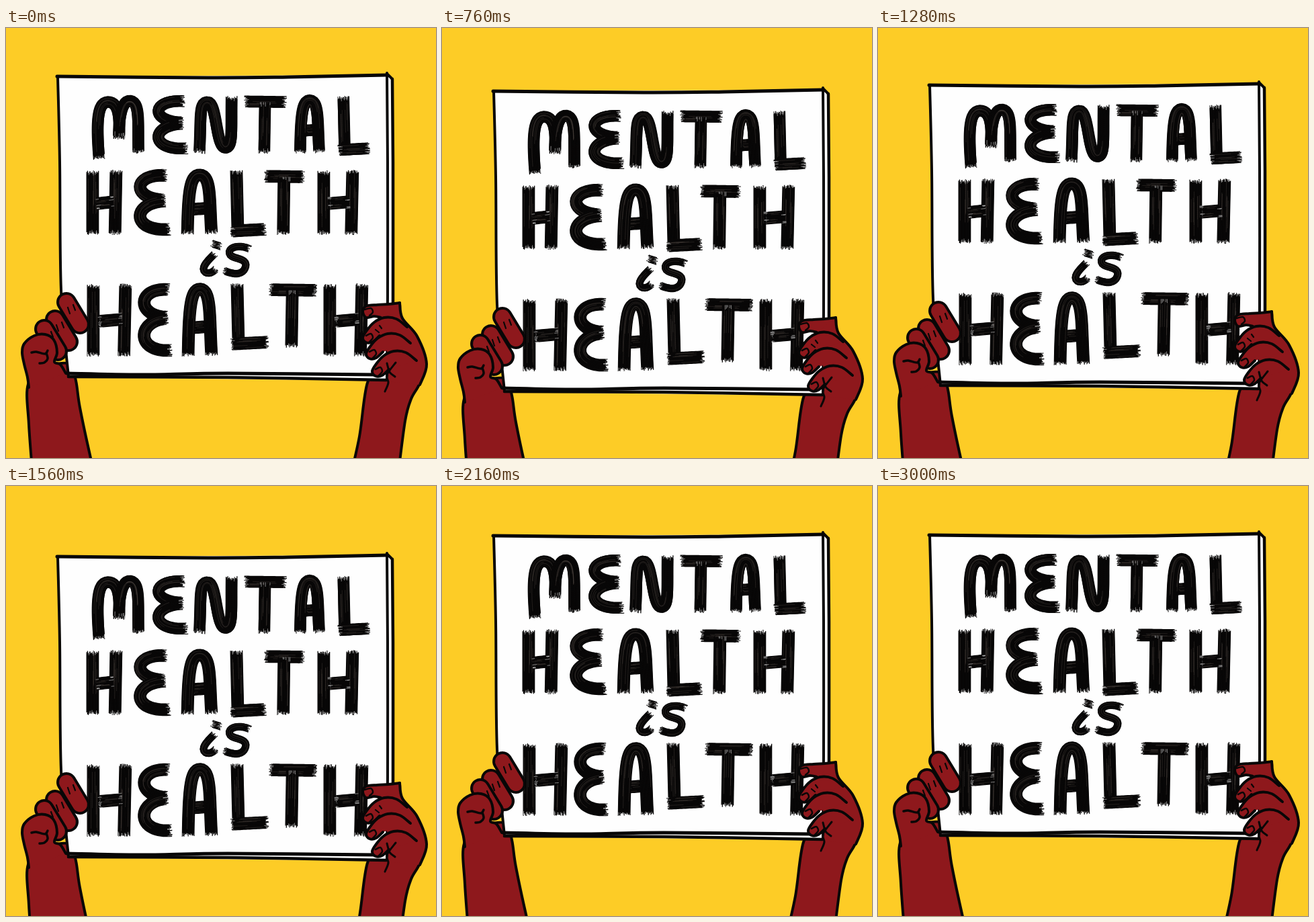
An HTML page with a canvas for the animation above (3040 ms loop, 640 by 640 pixels).

```html
<!DOCTYPE html>
<html lang="en">
<head>
<meta charset="utf-8">
<title>Mental health is health</title>
<style>
  html, body { margin: 0; width: 100%; height: 100%; overflow: hidden; background: #fdcc26; }
  canvas { display: block; }
</style>
</head>
<body>
<canvas id="stage" width="640" height="640" role="img" aria-label="Mental health is health"></canvas>
<script>
const RED = '#8e181c', BLACK = '#080707', WHITE = '#fefefe';
const stage = document.getElementById('stage').getContext('2d');

// The whole picture is painted once on a sheet a little taller than the stage.
const sheet = document.createElement('canvas');
sheet.width = 640;
sheet.height = 670;
const g = sheet.getContext('2d');
g.lineJoin = 'round';

let seed = 11;
const rnd = () => (seed = seed * 16807 % 2147483647) / 2147483647;

// Smooth line through "x,y x,y ..." points moved by dx, dy, optionally filled.
function ink(points, width = 4, fill = null, dx = 0, dy = 0) {
  const p = points.split(' ').map(s => s.split(',').map(Number)).map(([x, y]) => [x + dx, y + dy]);
  const at = i => p[Math.max(0, Math.min(p.length - 1, i))];
  g.beginPath();
  g.moveTo(...p[0]);
  for (let i = 0; i < p.length - 1; i++) {
    const [a, b, c, d] = [at(i - 1), at(i), at(i + 1), at(i + 2)];
    g.bezierCurveTo(b[0] + (c[0] - a[0]) / 6, b[1] + (c[1] - a[1]) / 6,
                    c[0] - (d[0] - b[0]) / 6, c[1] - (d[1] - b[1]) / 6, ...c);
  }
  g.lineCap = 'round';
  if (fill) { g.fillStyle = fill; g.fill(); }
  if (width) { g.strokeStyle = BLACK; g.lineWidth = width; g.stroke(); }
}

// Dry brush: parallel bristles with ragged ends along a path in a letter's box.
function brush(d, width, x, y, w, h) {
  const path = document.createElementNS('http://www.w3.org/2000/svg', 'path');
  let n = 0;
  path.setAttribute('d', d.replace(/-?[\d.]+/g, v => n++ % 2 ? y + v * h : x + v * w));
  const len = path.getTotalLength();
  const point = (s, off) => {
    const c = Math.max(0, Math.min(len, s));
    const a = path.getPointAtLength(Math.max(0, c - 1));
    const b = path.getPointAtLength(Math.min(len, c + 1));
    const m = path.getPointAtLength(c);
    const r = Math.hypot(b.x - a.x, b.y - a.y) || 1;
    const tx = (b.x - a.x) / r, ty = (b.y - a.y) / r;
    return [m.x + tx * (s - c) - ty * off, m.y + ty * (s - c) + tx * off];
  };
  const line = (from, to, off, thick, color) => {
    const steps = Math.max(2, Math.ceil((to - from) / 3));
    g.beginPath();
    for (let i = 0; i <= steps; i++) g.lineTo(...point(from + (to - from) * i / steps, off));
    g.lineWidth = thick;
    g.strokeStyle = color;
    g.stroke();
  };
  const fray = Math.min(4, len / 4);
  g.lineCap = 'butt';
  line(fray, len - fray, 0, width - 1, BLACK);
  for (let off = -width / 2 + .6; off < width / 2; off += 1.25)
    line(rnd() * fray - 1, len + 1 - rnd() * fray, off, 1.3, BLACK);
  for (let i = 0; i < width / 3; i++) {
    const off = (rnd() - .5) * (width - 4), s = rnd() * len * .4;
    line(s, s + len * (.3 + rnd() * .3), off, .6, 'rgba(90,80,74,.55)');
  }
  for (let i = 0; i < width / 4; i++) {
    const off = (rnd() - .5) * width, s = 3 + rnd() * fray;
    line(0, s, off, .7, 'rgba(255,255,255,.7)');
    line(len - s, len, -off, .7, 'rgba(255,255,255,.7)');
  }
}

// Brush strokes of each letter in a unit box.
const GLYPHS = {
  M: ['M.03 1.1C-.05 .4 0 .1 .25 .1C.55 .1 .53 .45 .52 .75', 'M.52 .7C.52 .35 .6 .08 .78 .08C1.05 .08 .98 .45 1 1'],
  E: ['M.9 .08C-.3 .04 -.3 .46 .85 .46', 'M.85 .48C-.32 .5 -.32 .97 1 .92'],
  N: ['M0 1C.06 .35 -.02 .1 .25 .1C.54 .1 .5 .91 .8 .91C1.05 .91 .98 .6 1 0'],
  T: ['M0 .09L1 .1', 'M.49 .1L.47 1'],
  A: ['M.1 .61L.9 .59', 'M0 1C.03 .35 .1 .07 .5 .07C1 .07 .9 .45 1 .99'],
  L: ['M0 0L.05 1', 'M-.2 .95L1 .92'],
  H: ['M0 .01L0 1', 'M1 0L.95 1', 'M.15 .52L.9 .49'],
  i: ['M.45 .02L1 .12', 'M.64 .35C.1 .65 -.2 .85 .04 .98C.25 1.07 .5 1 .7 .88'],
  s: ['M1 .2C.5 0 .05 .2 .27 .43C.45 .55 .95 .53 .82 .83C.7 1.12 .3 1.05 0 .92']
};

// A row of letters: each entry is letter, left, right and, if it ends early, its own bottom.
function word(pen, top, bottom, letters) {
  for (const [char, left, right, end = bottom] of letters)
    GLYPHS[char].forEach(d => brush(d, pen, left, top, right - left, end - top));
}

function drawArms() {
  ink('40,670 34,590 33,530 60,505 95,500 104,525 110,565 126,640 134,670', 4, RED);
  ink('512,670 526,608 538,528 560,505 612,515 615,530 603,552 594,585 583,670', 4, RED);
}

function drawSign() {
  g.beginPath();
  for (const p of [[77, 72], [567, 70], [576, 78], [577, 410], [567, 525], [94, 520], [82, 390]]) g.lineTo(...p);
  g.fillStyle = WHITE;
  g.fill();
  ink('76,72 300,74 420,73 567,70', 5);
  ink('77,72 80,200 82,390 93,519');
  ink('567,67 568,200 568,400 567,523');
  ink('567,68 575,76');
  ink('575,76 576,200 576,412', 4.5);
  ink('91,514 200,516 330,514 550,516', 5);
  ink('93,519 330,520 566,524', 4.5);
}

function drawLettering() {
  word(18, 102, 186, [['M', 137, 197], ['E', 227, 270], ['N', 288, 336], ['T', 355, 417], ['A', 438, 466], ['L', 502, 541]]);
  word(18.5, 212, 307, [['H', 129, 164], ['E', 200, 244], ['A', 270, 306], ['L', 343, 387], ['T', 385, 444], ['H', 473, 516]]);
  word(11.5, 320, 364, [['i', 295, 320], ['s', 324, 363]]);
  word(18.5, 381, 488, [['H', 130, 178], ['E', 206, 247], ['A', 271, 306], ['L', 344, 390, 475], ['T', 392, 462, 475], ['H', 482, 530]]);
}

// Curled fingers are capsules stepping down towards the thumb.
function drawLeftHand() {
  for (const [x, y] of [[90, 408], [73, 434], [57, 448]]) {
    g.lineCap = 'round';
    for (const [width, color] of [[30, BLACK], [22, RED]]) {
      g.beginPath();
      g.moveTo(x, y);
      g.lineTo(x + 20, y + 33);
      g.lineWidth = width;
      g.strokeStyle = color;
      g.stroke();
    }
    ink('0,0 3,9', 2.2, null, x + 2, y + 8);
    ink('0,0 3,8', 2.2, null, x + 10, y + 4);
  }
  ink('34,535 32,520 27,500 24,483 27,470 42,458 58,456 71,464 76,483 72,497 81,501 89,514', 4, RED);
  ink('38,483 45,482 58,485 62,480', 3.5);
  ink('60,484 62,492 57,498 50,499', 3.5);
}

function drawRightHand() {
  const back = '586,409 590,432 612,459 626,500 616,531';
  ink('567,526 570,500 560,425 ' + back, 0, RED);
  ink(back);
  ink('586,409 570,411 553,412 536,414 531,422 536,431 548,429 558,431', 4, RED);
  for (const [x, y] of [[531, 461], [536, 485], [545, 511]]) {
    ink('66,-16 50,-28 32,-30 17,-23 6,-11 0,0 5,7 15,6 25,-3', 4, RED, x, y);
    ink('5,-3 12,-6 15,0 10,6', 2.5, null, x, y);
  }
  ink('534,419 543,417 546,423 541,428', 2.5);
  ink('550,449 555,453', 2.2);
  ink('556,443 559,447', 2.2);
  ink('567,499 571,512 579,519', 3);
  ink('580,498 567,516 569,528 564,541', 3);
}

drawArms();
drawSign();
drawLettering();
drawLeftHand();
drawRightHand();

// Three eased bobs per loop, stepped at 25 pictures a second.
const LOOP = 3040, STEP = 40, BOBS = 3, DROP = 33.5;
const start = performance.now();
function frame() {
  const t = Math.floor((performance.now() - start) % LOOP / STEP) * STEP;
  const h = (1 - Math.cos(2 * Math.PI * (t / LOOP * BOBS - .04))) / 2;
  const y = DROP * h * (1 + 3 * h - 2 * h * h) / 2;
  stage.fillStyle = '#fdcc26';
  stage.fillRect(0, 0, 640, 640);
  stage.drawImage(sheet, 0, Math.round(y));
  requestAnimationFrame(frame);
}
frame();
</script>
</body>
</html>
```
